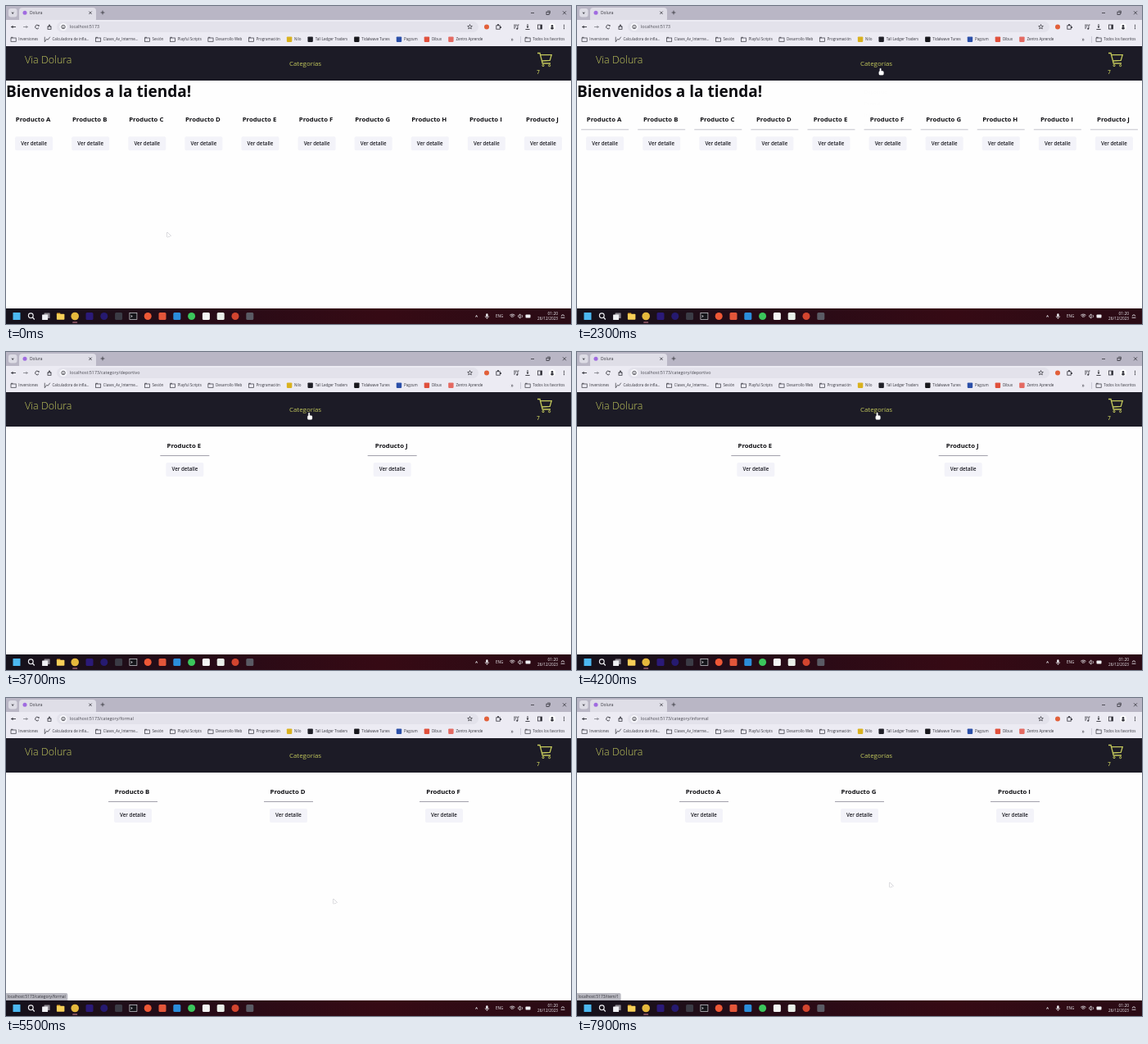
An HTML page with a canvas that plays this animation: 690 px wide and 388 px high, repeating every 8 s.

```html
<!DOCTYPE html>
<html lang="es">
<head>
<meta charset="utf-8">
<title>Dolura</title>
<style>
  html, body { margin: 0; width: 100%; height: 100%; overflow: hidden; background: #fefefe; }
  canvas { display: block; width: 690px; height: 388px; }
</style>
</head>
<body>
<canvas id="stage"></canvas>
<script>
const W = 690, H = 388, LOOP = 8000;
const canvas = document.getElementById('stage');
const ctx = canvas.getContext('2d');
const dpr = window.devicePixelRatio || 1;
canvas.width = W * dpr;
canvas.height = H * dpr;

const FONT = '"Open Sans", "Noto Sans", sans-serif';
const LIME = '#c3c85c', INK = '#34343c', WHITE = '#f0f0f4';
const HOST = 'localhost:5173';
const MENU = ['Deportivo', 'Formal', 'Informal', 'Niños'];
const ROW = 14.5;

// Each visit opens the menu, picks an item, then lets the pointer rest
const VISITS = [
  { open: 2300, at: 3050, item: 0, cards: 'EJ', rest: [370, 74] },
  { open: 4350, at: 4950, item: 1, cards: 'BDF', rest: [400, 245] },
  { open: 6750, at: 7400, item: 2, cards: 'AGI', rest: [382, 225], over: '/item/1' }
];
const POINTER = [[0, 197, 276]];
let rest = [197, 276];
for (const v of VISITS) {
  const x = 370.5 - 4 * v.item;
  v.path = '/category/' + MENU[v.item].toLowerCase();
  POINTER.push(
    [v.open - 650, ...rest], [v.open - 250, x, 74], [v.open - 100, x, 74],
    [v.at - 200, x, 103.5 + ROW * v.item], [v.at, x, 103.5 + ROW * v.item],
    [v.at + 450, ...v.rest]);
  rest = v.rest;
}
POINTER.push([LOOP, ...rest]);

const clamp = v => Math.max(0, Math.min(1, v));
const ease = p => p * p * (3 - 2 * p);
const mix = (a, b, p) => a + (b - a) * p;

// y is the middle of the capitals; returns the width
function text(s, x, y, size, color = INK, weight = 400, align = 'left') {
  ctx.font = `${weight} ${size}px ${FONT}`;
  ctx.textAlign = align;
  ctx.fillStyle = color;
  ctx.fillText(s, x, y + size * 0.357);
  return ctx.measureText(s).width;
}

function rect(x, y, w, h, color, r = 0) {
  ctx.fillStyle = color;
  ctx.beginPath();
  ctx.roundRect(x, y, w, h, r);
  ctx.fill();
}

function dot(x, y, r, color = INK) {
  ctx.fillStyle = color;
  ctx.beginPath();
  ctx.arc(x, y, r, 0, 7);
  ctx.fill();
}

function ring(x, y, r, color = INK, from = 0, to = 6.3, width = 0.8) {
  ctx.strokeStyle = color;
  ctx.lineWidth = width;
  ctx.beginPath();
  ctx.arc(x, y, r, from, to);
  ctx.stroke();
}

function line(color, width, ...pts) {
  ctx.strokeStyle = color;
  ctx.lineWidth = width;
  ctx.beginPath();
  for (let i = 0; i < pts.length; i += 2) ctx.lineTo(pts[i], pts[i + 1]);
  ctx.stroke();
}

function frame(x, y, w, h, color = INK, width = 0.8) {
  ctx.strokeStyle = color;
  ctx.lineWidth = width;
  ctx.strokeRect(x, y, w, h);
}

function cross(x, y, r) {
  line(INK, 0.8, x - r, y - r, x + r, y + r);
  line(INK, 0.8, x + r, y - r, x - r, y + r);
}

// An angle bracket; dx, dy point from its middle to the tip
function chevron(x, y, dx, dy, color = INK) {
  line(color, 0.9, x - dx - dy, y - dy - dx, x + dx, y + dy, x - dx + dy, y - dy + dx);
}

function arrow(x, y, dx, color) {
  chevron(x + dx * 1.5, y, dx, 0, color);
  line(color, 0.9, x - dx * 2.5, y, x + dx * 2.5, y);
}

function folder(x, y) {
  frame(x, y - 1.7, 6.2, 4.3, INK, 0.7);
  line(INK, 0.8, x, y - 2.4, x + 2.6, y - 2.4);
}

function tabs() {
  rect(0, 0, W, 18, '#b9b6c5');
  rect(3, 3, 10.5, 10.5, '#dddce5', 3);
  chevron(8.2, 8.5, 0, 1);
  rect(16, 2, 94, 18, '#dfdee7', 4);
  dot(23, 8.3, 2.5, '#a06be0');
  text('Dolura', 29, 8.3, 4.9);
  cross(103, 8.3, 1.7);
  line(INK, 0.8, 115.6, 8, 120.4, 8);
  line(INK, 0.8, 118, 5.6, 118, 10.4);
  line(INK, 0.8, 641, 8.5, 645, 8.5);
  frame(660, 7.2, 3.2, 3.2);
  line(INK, 0.7, 661.2, 6, 664.4, 6, 664.4, 9.3);
  cross(682, 8.3, 2);
}

function star(x, y) {
  const pts = [];
  for (let i = 0; i <= 10; i++) {
    const r = i % 2 ? 1.3 : 3, a = i * Math.PI / 5 - Math.PI / 2;
    pts.push(x + r * Math.cos(a), y + r * Math.sin(a));
  }
  line(INK, 0.7, ...pts);
}

function toolbar(t, path) {
  const y = 25.5;
  rect(0, 17, W, 32, '#ecebf3');
  arrow(9.2, y, -1.1);
  arrow(23.8, y, 1.1, '#8c8c94');
  if (t > 700 && t < 1500) cross(38, y, 2.1);
  else {
    ring(38, y, 2.3, INK, 0.5, 5.6, 0.9);
    chevron(40, 24, 0.6, 0);
  }
  chevron(53, 24.2, 0, -1.5);
  frame(51, 25, 4, 3.3);

  rect(62, 19, 515, 13, '#e3e2eb', 6.5);
  dot(70, y, 4.6, '#f6f6fa');
  ring(70, y, 2.2);
  line(INK, 0.8, 70, 25, 70, 26.8);
  text(HOST + path, 78, y, 5.35, '#4a4a52');
  star(566.5, y);

  dot(587, y, 3, '#e2603a');
  frame(598.8, 23.8, 4.4, 4.4);
  dot(601, 23, 1.1);
  dot(604, 26, 1.1);
  for (let i = 0; i < 3; i++) line(INK, 0.8, 620, 23.2 + i * 1.9, 624 - i, 23.2 + i * 1.9);
  dot(624.2, 27.8, 1);
  line(INK, 0.8, 624.9, 27.8, 624.9, 23, 626.5, 23);
  line(INK, 0.9, 637, 22, 637, 26.3);
  chevron(637, 25.6, 0, 0.9);
  line(INK, 0.9, 634.4, 28.5, 639.6, 28.5);
  frame(649.5, 23, 5, 5);
  rect(652.4, 23, 2.2, 5, INK);
  dot(667, y, 4, '#ffffff');
  dot(667, 24.2, 1.3);
  rect(665.3, 25.6, 3.4, 2.8, INK, 1.2);
  for (let i = -1; i < 2; i++) dot(681.5, y + i * 2, 0.65);
}

function bookmarks() {
  const y = 40.7, size = 4.5;
  const marks = [['Inversiones'], ['Calculadora de infla...'], ['Clases_Av_Interme...'], ['Sesión'],
    ['Playful Scripts'], ['Desarrollo Web'], ['Programación'],
    ['Nilo', '#d9b21f'], ['Tall Ledger Traders', '#202028'], ['Tidalwave Tunes', '#17171c'],
    ['Pagzum', '#2b4fa8'], ['Dibux', '#e0503c'], ['Zentro Aprende', '#e46a62']];
  let x = 6;
  for (const [name, color] of marks) {
    if (color) rect(x, y - 3.2, 6.4, 6.4, color, 0.8);
    else if (name.startsWith('Calc')) line(INK, 0.7, x, y - 3, x, y + 3, x + 2.5, y - 0.5, x + 4, y + 0.5, x + 6.5, y - 3);
    else folder(x, y);
    x += 9.2 + text(name, x + 9.2, y, size) + 8;
  }
  text('»', 616.5, y, 6.5);
  line('#c0bfca', 0.7, 628.5, 37, 628.5, 45);
  folder(634, y);
  text('Todos los favoritos', 643.2, y, size);
}

function header() {
  rect(0, 49, W, 42, '#1c1b26');
  text('Via Dolura', 23, 66, 12.5, LIME, 300);
  text('Categorías', 346, 70.5, 7.9, LIME);
  line(LIME, 1.3, 649, 57.5, 652, 57.5, 655.2, 70, 665, 70);
  line(LIME, 1.3, 652.6, 59.6, 666.2, 59.6, 664.2, 66.4, 654.4, 67);
  for (const x of [656, 663.6]) ring(x, 72.6, 1.1, LIME, 0, 6.3, 1);
  text('7', 648.2, 80.3, 6.2, LIME, 600);
}

function shop(t, visit) {
  const cards = visit ? visit.cards : 'ABCDEFGHIJ';
  const n = cards.length, y = visit ? 114 : 138.3, half = visit ? 30 : 29;
  const rule = visit ? '#a3a1ac' : `rgba(196,196,204,${clamp(t / 600)})`;
  if (!visit) text('Bienvenidos a la tienda!', 0, 104.3, 19, '#0c0c10', 700);
  for (let i = 0; i < n; i++) {
    const x = W / 2 + (i - (n - 1) / 2) * 760 / (n + 1);
    text('Producto ' + cards[i], x - 1, y, 7.75, '#0c0c10', 700, 'center');
    line(rule, 1, x - half, y + 12.5, x + half, y + 12.5);
    rect(x - 23, y + 21, 46, 17, '#f3f3f9', 2);
    text('Ver detalle', x, y + 29.3, 6.15, '#18181f', 600, 'center');
  }
}

function menu(t, pointerY) {
  const v = VISITS.find(v => t >= v.open && t < v.at + 180);
  if (!v) return;
  const p = Math.min(clamp((t - v.open) / 150), clamp((v.at + 180 - t) / 80));
  const scale = mix(0.95, 1, p);
  const active = Math.max(0, Math.floor((pointerY - 97) / ROW));
  ctx.save();
  ctx.globalAlpha = clamp(p * 2);
  ctx.translate(346, 97);
  ctx.scale(scale, scale);
  rect(0, 0, 91, 60, '#fefefe', 2);
  rect(0, 1 + active * ROW, 91, 14, p < 1 ? '#f1f1f6' : '#e7e7e8', 2);
  MENU.forEach((s, i) => text(s, 5.2, 8.4 + i * ROW, 6.3, '#3c3c44'));
  ctx.restore();
}

function status(t) {
  const v = VISITS.find(v => t >= v.at - 100 && t < v.at + 650);
  if (!v) return;
  const s = HOST + (v.over && t > v.at + 150 ? v.over : v.path);
  ctx.save();
  ctx.globalAlpha = clamp((t - v.at + 100) / 300);
  ctx.font = `400 4.9px ${FONT}`;
  rect(0, 360, ctx.measureText(s).width + 4, 9, '#b9b9c1', [0, 2, 0, 0]);
  text(s, 1.5, 364.3, 4.9);
  ctx.restore();
}

function apps(y) {
  const at = i => 13 + 17.8 * i;
  const colors = ['#2b1a78', '#261a70', '#3b3b45', '#15151a', '#ee5836', '#e3563a', '#2b8ddb',
    '#3bc65c', '#f4f4f4', '#e9efe9', '#d2452f', '#5a5a64'];
  rect(at(0) - 4.5, y - 4.5, 9, 9, '#4cb8f0', 0.5);
  ring(at(1) - 0.5, y - 0.7, 2.9, WHITE, 0, 6.3, 1.1);
  line(WHITE, 1.2, at(1) + 1.7, y + 1.5, at(1) + 4, y + 4);
  rect(at(2) - 2, y - 4, 7, 6.5, '#8d8890', 0.5);
  rect(at(2) - 4.5, y - 2, 7, 6.5, WHITE, 0.5);
  rect(at(3) - 4.5, y - 4, 4.5, 3, '#d99a28', 0.6);
  rect(at(3) - 4.5, y - 2.8, 9.5, 7, '#f7cf58', 0.8);
  dot(at(4), y, 4.8, '#e5b83c');
  rect(at(4) - 3, 385.6, 6, 1, '#e08a9c', 0.5);
  colors.forEach((color, i) => rect(at(i + 5) - 4.5, y - 4.5, 9, 9, color, i % 3 === 1 ? 4.5 : 1.5));
  frame(at(8) - 4.5, y - 4, 9, 8, '#d5d5da', 0.7);
  chevron(at(8) - 2, y, 0.8, 0, WHITE);
}

function tray(y) {
  chevron(574.6, y, 0, -1, WHITE);
  rect(586.2, y - 3.3, 2.4, 4.3, WHITE, 1.2);
  ring(587.4, y - 0.2, 2.3, WHITE, 0, Math.PI, 0.6);
  line(WHITE, 0.6, 587.4, y + 2, 587.4, y + 3.5);
  text('ENG', 598, y, 4.6, WHITE);
  for (let r = 1.6; r < 5; r += 1.5) ring(618.3, y + 2.2, r, WHITE, -2.35, -0.8);
  line(WHITE, 0.8, 628, y + 2.6, 625, y, 628, y - 2.6, 628, y + 2.6);
  ring(628.3, y, 2.2, WHITE, -0.8, 0.8);
  rect(634.5, y - 2, 6, 4, WHITE, 0.8);
  text('01:20', 674, 375, 4.9, WHITE, 400, 'right');
  text('26/12/2023', 674, 381.6, 4.7, WHITE, 400, 'right');
  ring(680, y, 1.7, WHITE, Math.PI, 6.3);
  line(WHITE, 0.8, 677.6, y + 1.8, 682.4, y + 1.8);
}

function taskbar() {
  const g = ctx.createLinearGradient(0, 0, W, 0);
  ['#15121c', '#260b17', '#360a14', '#2a0b15'].forEach((c, i) => g.addColorStop(i / 3, c));
  rect(0, 369, W, 19, g);
  apps(378.5);
  tray(378.5);
}

function pointerAt(t) {
  const i = POINTER.findIndex(k => k[0] > t);
  const [t0, x0, y0] = POINTER[i - 1], [t1, x1, y1] = POINTER[i];
  const p = ease((t - t0) / (t1 - t0));
  return [mix(x0, x1, p), mix(y0, y1, p)];
}

function pointer(x, y) {
  const hand = x > 340 && x < 440 && y > 60 && y < 156;
  const shape = new Path2D();
  if (hand) {
    shape.roundRect(x - 0.7, y, 1.6, 6, 0.8);
    shape.roundRect(x - 1.8, y + 3.4, 5.8, 5, 1.5);
  } else {
    shape.moveTo(x, y);
    shape.lineTo(x, y + 6);
    shape.lineTo(x + 4.2, y + 4.4);
    shape.closePath();
  }
  ctx.strokeStyle = hand ? '#55555e' : '#a9a9b1';
  ctx.lineWidth = 0.8;
  ctx.stroke(shape);
  ctx.fillStyle = '#ffffff';
  ctx.fill(shape);
}

function draw(t) {
  const shown = delay => VISITS.filter(v => t >= v.at + delay).pop();
  const [px, py] = pointerAt(t);
  ctx.setTransform(dpr, 0, 0, dpr, 0, 0);
  rect(0, 0, W, H, '#fefefe');
  tabs();
  toolbar(t, shown(80)?.path ?? '');
  bookmarks();
  header();
  shop(t, shown(0));
  menu(t, py);
  status(t);
  taskbar();
  pointer(px, py);
}

const start = performance.now();
function tick() {
  draw((performance.now() - start) % LOOP);
  requestAnimationFrame(tick);
}
tick();
</script>
</body>
</html>
```
